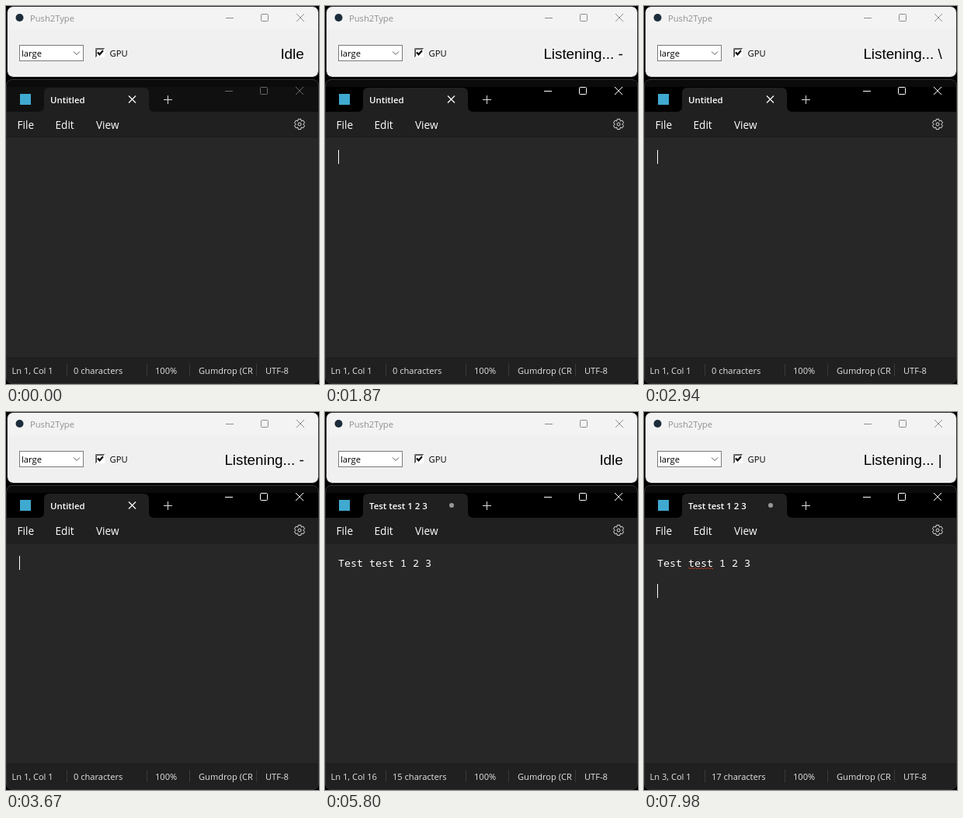
Write an HTML page that moves like this. It is 403 by 486 pixels and loops after 8000 ms.

```html
<!DOCTYPE html>
<html lang="en">
<head>
<meta charset="utf-8">
<title>Push2Type</title>
<style>
html, body { margin: 0; width: 403px; height: 486px; overflow: hidden; background: #000; }
svg { display: block; font: 11.2px "Open Sans", "Noto Sans", sans-serif; }
text { white-space: pre; }
.line { fill: none; stroke: currentColor; }
.menu { font-size: 13.6px; fill: #fff; }
.bar { fill: #e4e4e4; font-size: 11.1px; }
.code { font: 13.33px "Noto Sans Mono", "DejaVu Sans Mono", monospace; fill: #fff; }
#state { font: 18.8px "Liberation Sans", Arial, sans-serif; text-anchor: end; }
#tab { font-size: 11.4px; font-weight: 600; fill: #fff; }
</style>
</head>
<body>
<svg width="403" height="486" viewBox="0 0 403 486">
  <defs>
    <path id="buttons" class="line" d="M0 5.5h10 M46.500 .5h7q1 0 1 1v7q0 1-1 1h-7q-1 0-1-1v-7q0-1 1-1z M91 0l10 10m0-10l-10 10"/>
    <clipPath id="panel"><rect x="2" y="1" width="400" height="90" rx="7"/></clipPath>
    <clipPath id="frame"><rect x="1" y="95" width="401" height="390" rx="7"/></clipPath>
  </defs>

  <!-- Control window -->
  <g clip-path="url(#panel)">
    <rect width="403" height="92" fill="#f0f0f0"/>
    <rect width="403" height="30" fill="#f3f3f3"/>
  </g>
  <rect class="line" x="1.500" y=".5" width="401" height="91" rx="7.500" color="#2a2a2a"/>
  <circle cx="17.500" cy="15" r="5" fill="#1c2c3a"/>
  <text x="31" y="20" fill="#8f8f8f">Push2Type</text>
  <use href="#buttons" x="283" y="10" color="#8c8c8c"/>
  <rect x="17.500" y="50.500" width="82" height="20" fill="#fff" stroke="#7a7a7a"/>
  <text x="20" y="65">large</text>
  <path class="line" d="M87 58.500l4 4 4-4" color="#555"/>
  <rect x="115" y="54" width="12" height="12" fill="#fff"/>
  <path class="line" d="M115.500 66V54.500H127" color="#777"/>
  <path class="line" d="M116.500 65V55.500H126" color="#444"/>
  <path class="line" d="M118 59.500l2.500 2.800 4.500-5" stroke-width="2.200"/>
  <text x="133.500" y="65">GPU</text>
  <text id="state" x="383.700" y="68"></text>

  <!-- Editor window -->
  <g clip-path="url(#frame)">
    <rect y="94" width="403" height="392" fill="#272727"/>
    <rect y="94" width="403" height="42" fill="#0b0b0b"/>
    <rect id="titlebar" y="104" width="403" height="32"/>
    <path d="M42 136q7 0 7-7v-17q0-7 7-7h121q7 0 7 7v17q0 7 7 7z" fill="#202020"/>
    <rect y="136" width="403" height="32" fill="#202020"/>
    <rect y="168" width="403" height="1" fill="#1b1b1b"/>
    <rect y="452" width="403" height="34" fill="#202020"/>
    <rect y="452" width="403" height="1" fill="#1b1b1b"/>
  </g>
  <rect class="line" x=".5" y="94.500" width="402" height="391" rx="7.500" color="#333"/>
  <rect x="18" y="113" width="14" height="14" fill="#3fa9d0"/>
  <text id="tab" x="57" y="125"></text>
  <path id="close" class="line" d="M158 115.500l9 9m0-9l-9 9" stroke-width="1.200" color="#fff"/>
  <circle id="dot" cx="163" cy="120" r="3" fill="#979797"/>
  <path class="line" d="M203 120.500h11M208.500 115v11" color="#ddd"/>
  <use id="controls" href="#buttons" x="282" y="104"/>
  <g class="menu">
    <text x="14.500" y="158">File</text>
    <text x="63.500" y="158">Edit</text>
    <text x="116" y="158">View</text>
  </g>
  <path id="gear" class="line" color="#ddd" stroke-linejoin="round"/>
  <circle class="line" cx="378" cy="152" r="2" color="#ddd"/>

  <text id="words" class="code" x="17" y="199"></text>
  <path id="wave" class="line" color="#a33a22"/>
  <rect id="caret" width="1" height="18" fill="#fff"/>

  <g class="bar">
    <text id="place" x="7.500" y="473"></text>
    <text id="count" x="87" y="473"></text>
    <text x="192" y="473">100%</text>
    <text x="248" y="473">Gumdrop (CR</text>
    <text x="334" y="473">UTF-8</text>
  </g>
  <path class="line" d="M78.500 460v16M181.500 460v16M236.500 460v16M322.500 460v16" color="#383838"/>
</svg>
<script>
const LOOP = 8000, PHRASE = "Test test 1 2 3";
const TYPED = 5260, BREAK1 = 6070, BREAK2 = 6450;
const $ = id => document.getElementById(id);

// Each tick moves the spinner to its next glyph; each blink toggles the caret.
const SPIN = "|/-\\";
const TICKS = [1470, 1670, 1870, 2140, 2340, 2540, 2740, 2940, 3200, 3400, 3600,
  6920, 7120, 7390, 7580, 7780, 7980];
const BLINKS = [470, 1000, 1530, 2070, 2600, 3140, 3670, 4200, 4730, 5800, 6070, 6980, 7520];

const passed = (list, t) => list.filter(at => at <= t).length;
const ramp = (t, from, to) => Math.min(1, Math.max(0, (t - from) / (to - from)));
const grey = v => `rgb(${v},${v},${v})`;
const show = (id, on) => $(id).setAttribute("visibility", on ? "visible" : "hidden");
function write(id, text) {
  if ($(id).textContent !== text) $(id).textContent = text;
}

function gearPath() {
  const points = [];
  for (let i = 0; i < 6; i++) {
    for (const [turn, r] of [[-15, 6.8], [15, 6.8], [30, 4.6]]) {
      const a = (i * 60 + turn) * Math.PI / 180;
      points.push(`${378 + r * Math.sin(a)} ${152 - r * Math.cos(a)}`);
    }
  }
  return "M" + points.join("L") + "Z";
}

$("gear").setAttribute("d", gearPath());
$("wave").setAttribute("d", "M57 201" + "q1 -2 2 0t2 0".repeat(8));

function draw(t) {
  const typed = t >= TYPED;
  const listening = t >= 1470 && t < 5400 || t >= 6920;
  const glyph = SPIN[(passed(TICKS, t) + 3) % 4];
  write("state", listening ? "Listening... " + glyph : "Idle");

  $("controls").setAttribute("color", grey(Math.round(105 + 150 * ramp(t, 20, 270))));
  $("titlebar").setAttribute("fill", grey(Math.round(16 * (1 - ramp(t, 400, 800)))));

  write("tab", typed ? PHRASE : "Untitled");
  write("words", typed ? PHRASE : "");
  show("close", !typed);
  show("dot", typed);
  show("wave", t >= BREAK1);

  const row = (t >= BREAK1) + (t >= BREAK2);
  $("caret").setAttribute("x", typed && !row ? 137 : 17);
  $("caret").setAttribute("y", 185 + 18 * row);
  show("caret", passed(BLINKS, t) % 2);

  // The status bar trails the second line break slightly.
  const line = 1 + (t >= BREAK1) + (t >= BREAK2 + 70);
  write("place", `Ln ${line}, Col ${typed && line === 1 ? 16 : 1}`);
  write("count", `${typed ? 14 + line : 0} characters`);
}

const start = performance.now();
function tick() {
  draw((performance.now() - start) % LOOP);
  requestAnimationFrame(tick);
}
tick();
</script>
</body>
</html>
```
